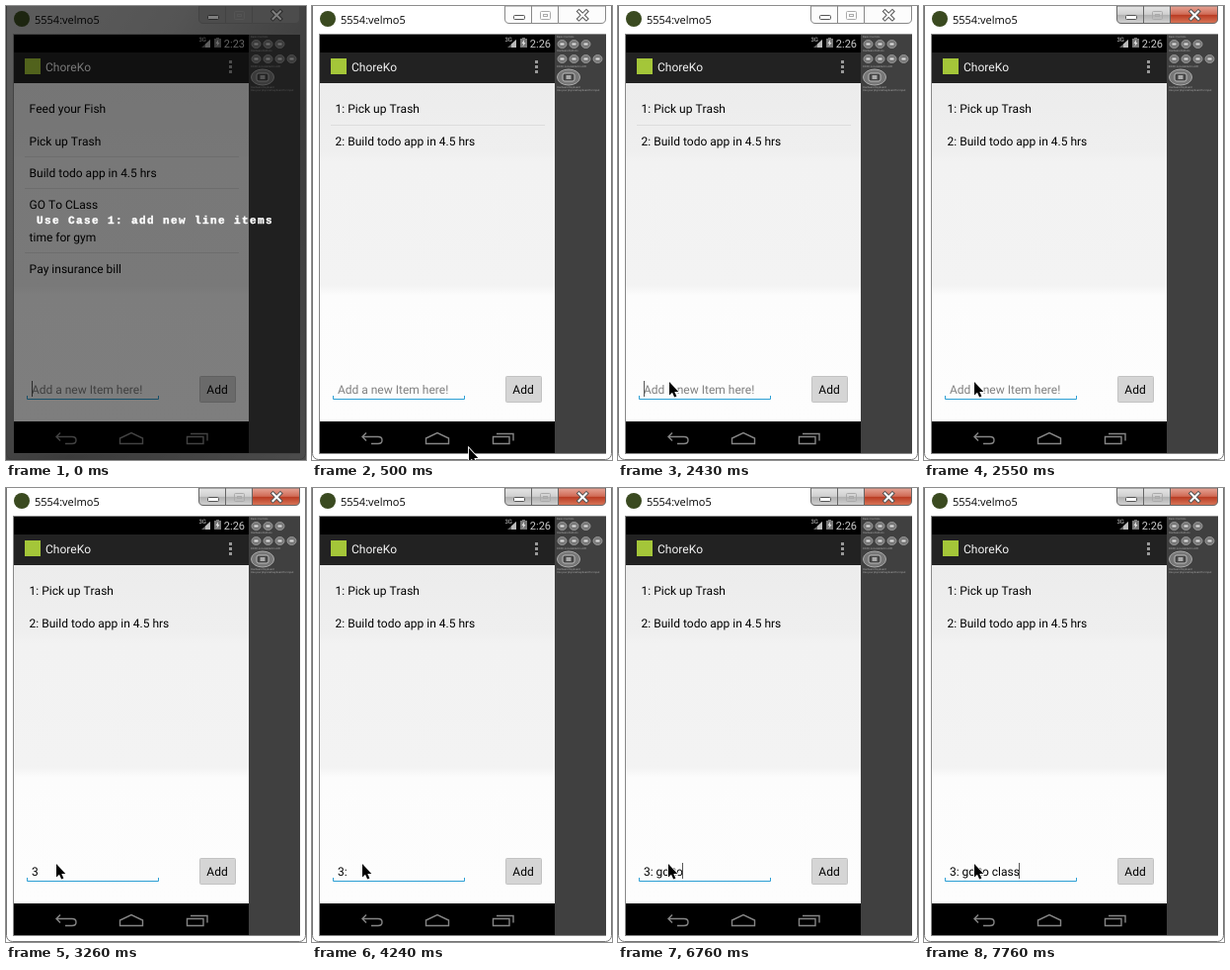
Write an HTML page that moves like this. It is 304 px wide and 459 px high and loops after 8 s.

```html
<!DOCTYPE html>
<html lang="en">
<head>
<meta charset="utf-8">
<title>List app demo</title>
<style>
html, body { margin: 0; width: 100%; height: 100%; overflow: hidden; background: #fff; }
svg { display: block; width: 304px; height: 459px; }
text { font: 12px Roboto, sans-serif; font-kerning: none; fill: #000; white-space: pre; text-rendering: geometricPrecision; }
.title { font: 11px "Open Sans", sans-serif; }
.bar { fill: #f3f3f3; }
.clock { font-size: 11px; fill: #ccc; }
.hint { fill: #808080; }
.tiny { font-size: 2.7px; fill: #aaa; }
.caption { font: bold 11px "Liberation Mono", monospace; letter-spacing: 1.4px; fill: #fff; stroke: #fff; stroke-width: .4; }
</style>
</head>
<body>
<svg viewBox="0 0 304 459">
  <defs>
    <linearGradient id="page" gradientUnits="userSpaceOnUse" x1="0" y1="77" x2="0" y2="419">
      <stop offset="0" stop-color="#ececec"/>
      <stop offset=".205" stop-color="#efefef"/>
      <stop offset=".235" stop-color="#f2f2f2"/>
      <stop offset=".6" stop-color="#f3f3f3"/>
      <stop offset=".63" stop-color="#fcfcfc"/>
      <stop offset="1" stop-color="#fdfdfd"/>
    </linearGradient>
    <linearGradient id="glass" x1="0" y1="0" x2="1" y2="1">
      <stop offset="0" stop-color="#bbb"/>
      <stop offset=".3" stop-color="#aaa"/>
      <stop offset=".6" stop-color="#777"/>
      <stop offset="1" stop-color="#999"/>
    </linearGradient>
    <linearGradient id="grey" x1="0" y1="0" x2="0" y2="1">
      <stop offset="0" stop-color="#e6e6e6"/>
      <stop offset=".48" stop-color="#d0d0d0"/>
      <stop offset=".52" stop-color="#b0b0b0"/>
      <stop offset="1" stop-color="#d2d2d2"/>
    </linearGradient>
    <linearGradient id="red" x1="0" y1="0" x2="0" y2="1">
      <stop offset="0" stop-color="#e6a597"/>
      <stop offset=".48" stop-color="#d06a55"/>
      <stop offset=".52" stop-color="#b93a22"/>
      <stop offset="1" stop-color="#d9785a"/>
    </linearGradient>
  </defs>

  <!-- window -->
  <rect width="304" height="459" fill="#fff"/>
  <rect id="tint" width="304" height="459" fill="url(#glass)"/>
  <rect x=".5" y="-6" width="303" height="464.5" rx="6" fill="none" stroke="#777"/>
  <rect x="7.5" y="28.5" width="290" height="424" fill="none" stroke="#888"/>
  <circle cx="16" cy="13" r="8" fill="#3a4a20"/>
  <text class="title" x="29" y="18">5554:velmo5</text>
  <g id="buttons" stroke="#777">
    <path id="minmax" d="M195.500 0H249.500V17.500H200Q195.500 17.500 195.500 13ZM222.500 0V17.500"/>
    <path id="close" d="M249.500 0H297.500V13Q297.500 17.500 293 17.500H249.500Z"/>
  </g>
  <rect x="204.500" y="9.500" width="11" height="4" rx="1" fill="#fff" stroke="#555"/>
  <g fill="none" stroke="#aaa">
    <rect x="231.500" y="5.500" width="10" height="8" rx="1"/>
    <rect x="234.500" y="8.500" width="4" height="2"/>
  </g>
  <g fill="none" stroke-linecap="square">
    <path d="M270.500 5.500L278 13M278 5.500L270.500 13" stroke="#555" stroke-width="4"/>
    <path d="M270.500 5.500L278 13M278 5.500L270.500 13" stroke="#fff" stroke-width="2"/>
  </g>

  <!-- side panel -->
  <rect x="246" y="29" width="52" height="423" fill="#404040"/>
  <g id="panel"></g>

  <!-- phone -->
  <rect x="8" y="29" width="238" height="423" fill="#000"/>
  <rect x="8" y="47" width="238" height="31" fill="#222"/>
  <rect x="8" y="78" width="238" height="342" fill="url(#page)"/>
  <text class="clock" x="195.500" y="36" style="font-size:6px">3G</text>
  <path d="M198 42L207 34V42Z" fill="#666"/>
  <path d="M202 42V38.500L207 34V42Z" fill="#bbb"/>
  <path d="M211 33H213V32H216V33H218V42H211Z" fill="#777"/>
  <path d="M215 34L212.500 38H214L213.500 41L216.500 37H215Z" fill="#ddd"/>
  <text class="clock" id="clock" x="220.800" y="42"></text>
  <rect x="19" y="53" width="16" height="16" fill="#a4c639"/>
  <text class="bar" x="40" y="66">ChoreKo</text>
  <path d="M226 55h3v3h-3zM226 60h3v3h-3zM226 65h3v3h-3z" fill="#999"/>
  <g id="list"></g>
  <path d="M21.500 394V397.500H154.500V394" fill="none" stroke="#2c9fd4"/>
  <text id="field" x="25.900" y="392"></text>
  <rect id="caret" y="379" width="1" height="16" fill="#555"/>
  <rect x="196.500" y="374.500" width="36" height="26" rx="1" fill="#d5d5d5" stroke="#c2c2c2"/>
  <text x="203.300" y="392">Add</text>
  <g fill="none" stroke="#858585" stroke-width="1.400" transform="translate(0 .5)">
    <path d="M55 431L51 435L55 439M51 435H67Q71 435 71 438.500Q71 442 67 442H60"/>
    <path d="M115.500 442V436.500L127 431L138.500 436.500V442Z"/>
    <path d="M183.500 435H200V442H183.500ZM187 432H204V439"/>
  </g>

  <path id="mouse" d="M0 0V13.500L3 10.800L5.200 15.500L7.400 14.500L5.300 10H9.300Z" fill="#000" stroke="#fff" stroke-width="1.800" paint-order="stroke"/>

  <g id="intro">
    <rect width="304" height="459" opacity=".5"/>
    <text class="caption" x="31" y="220">Use Case 1: add new line items</text>
  </g>
</svg>
<script>
const LOOP = 8000, HINT = 'Add a new Item here!';
const $ = id => document.getElementById(id);
const ui = {};
for (const id of ['tint', 'minmax', 'close', 'buttons', 'clock', 'list', 'field', 'caret', 'mouse', 'intro', 'panel'])
  ui[id] = $(id);

// [start ms, value]; each value holds until the next
const typed = [[0, ''], [3260, '3'], [4240, '3:'], [5680, '3: g'], [5800, '3: go'],
  [6490, '3: go '], [6620, '3: go t'], [6760, '3: go to'], [6910, '3: go to '],
  [7230, '3: go to c'], [7350, '3: go to cl'], [7500, '3: go to cla'],
  [7640, '3: go to clas'], [7760, '3: go to class']];
const blink = [[0, 1], [500, 0], [1050, 1], [1480, 0], [2010, 1], [2550, 0], [2970, 1],
  [3260, 0], [5680, 1], [6230, 0], [6490, 1]];
const moves = [[500, [159, 447]], [1600, [150, 438]], [1730, [143, 431]], [1880, [112, 427]],
  [2010, [73, 421]], [2150, [61, 405]], [2280, [54, 394]], [2430, [52, 380]], [2550, [51, 380]]];

const at = (track, t) => {
  let value = null;
  for (const [start, v] of track) if (t >= start) value = v;
  return value;
};

const rowsHtml = (items, lines) =>
  items.map((s, i) => `<text x="23.600" y="${Math.round(108.2 + i * 32.4)}">${s}</text>`).join('') +
  lines.map(y => `<rect x="19" y="${y}" width="217" height="1" fill="#dcdcdc"/>`).join('');

const before = rowsHtml(['Feed your Fish', 'Pick up Trash', 'Build todo app in 4.5 hrs',
  'GO To CLass', 'time for gym', 'Pay insurance bill'], [152, 184, 249]);
const items = ['1: Pick up Trash', '2: Build todo app in 4.5 hrs'];
const lined = rowsHtml(items, [120]), plain = rowsHtml(items, []);

function panelHtml() {
  const note = (y, s) => `<text class="tiny" x="248" y="${y}">${s}</text>`;
  const key = (x, y) => `<ellipse cx="${x}" cy="${y}" rx="4.500" ry="4" fill="#777" stroke="#a5a5a5" stroke-width=".8"/>
    <rect x="${x - 2}" y="${y - 1}" width="4" height="2" fill="#ddd"/>`;
  const row = (n, y) => Array.from({length: n}, (_, i) => key(253.5 + i * 12, y)).join('');
  return note(32, 'Basic Controls') + row(3, 38.5) + note(46, 'Hardware Buttons') + row(4, 53.5) +
    note(62, 'DPAD not enabled in AVD') +
    `<ellipse cx="260" cy="72" rx="11.500" ry="8" fill="#777" stroke="#aaa"/>
     <rect x="254" y="68" width="12" height="8" rx="2" fill="#444" stroke="#bbb"/>
     <rect x="257.500" y="70" width="5" height="4" fill="#aaa"/>` +
    note(83, 'Hardware Keyboard') + note(86, 'Use your physical keyboard for input');
}

const show = (el, on) => el.style.display = on ? '' : 'none';

function draw(t) {
  const intro = t < 500, active = t >= 2550;
  show(ui.intro, intro);
  show(ui.tint, intro);
  ui.buttons.setAttribute('stroke', active ? '#666' : '#888');
  ui.minmax.setAttribute('fill', active ? 'url(#grey)' : intro ? '#999' : '#fcfcfc');
  ui.close.setAttribute('fill', active ? 'url(#red)' : intro ? '#999' : '#fcfcfc');
  ui.clock.textContent = intro ? '2:23' : '2:26';

  const rows = intro ? before : active ? plain : lined;
  if (ui.rows !== rows) ui.list.innerHTML = ui.rows = rows;

  const text = at(typed, t);
  ui.field.textContent = text || HINT;
  ui.field.setAttribute('class', text ? '' : 'hint');
  const width = text ? ui.field.getComputedTextLength() : 0;
  ui.caret.setAttribute('x', text ? Math.floor(25.9 + width) : 26);
  show(ui.caret, at(blink, t));

  const pos = at(moves, t);
  show(ui.mouse, pos);
  if (pos) ui.mouse.setAttribute('transform', `translate(${pos})`);
}

ui.panel.innerHTML = panelHtml();
const begin = performance.now();
function tick() {
  draw((performance.now() - begin) % LOOP);
  requestAnimationFrame(tick);
}
tick();
</script>
</body>
</html>
```
